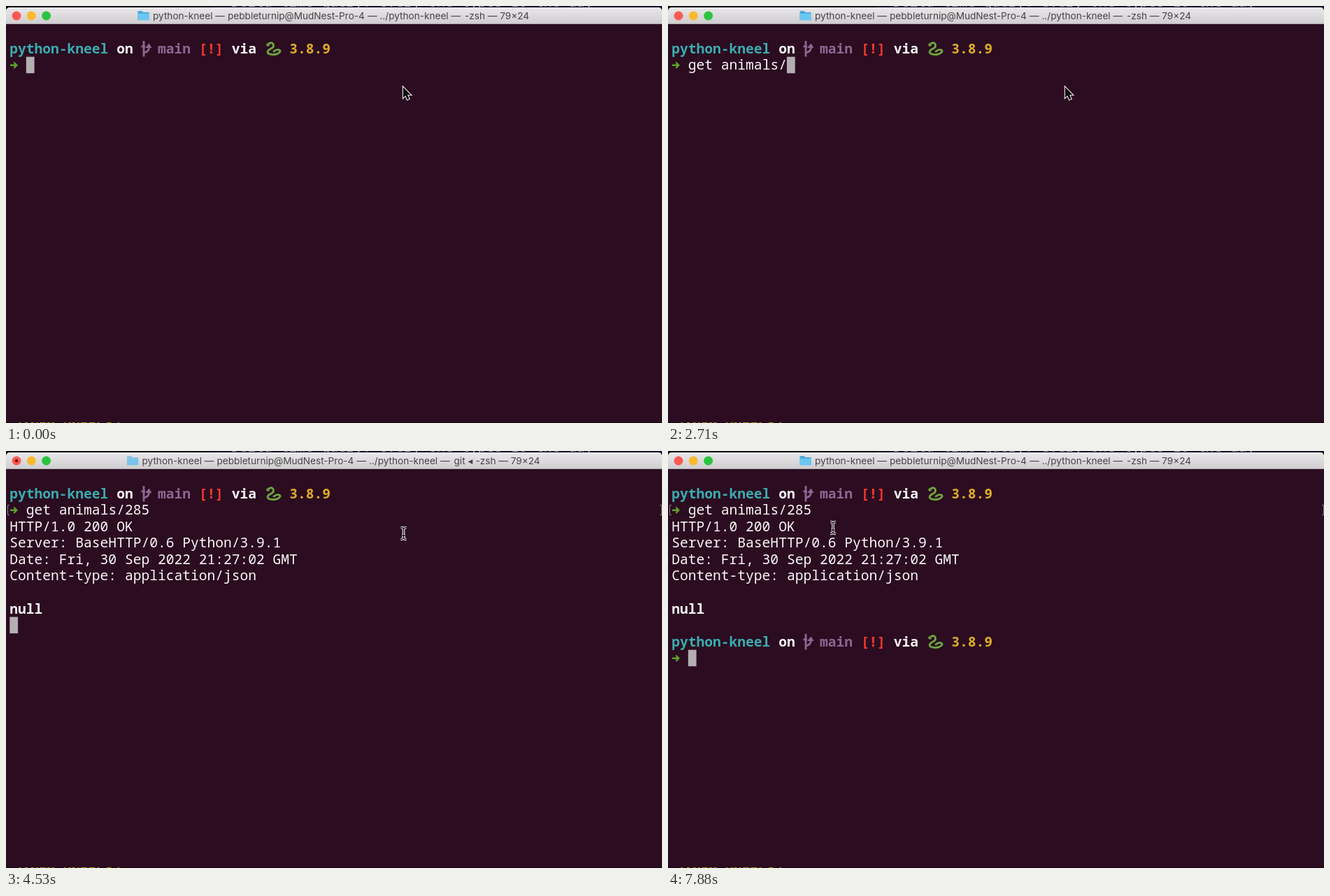
These frames come from a looping animation (938 px wide and 597 px high, 8 s). An HTML page with a canvas:

```html
<!DOCTYPE html>
<html lang="en">
<head>
<meta charset="utf-8">
<title>Terminal request</title>
<style>
  html, body { margin: 0; width: 100%; height: 100%; overflow: hidden; background: #2b0c20; }
  canvas { display: block; }
</style>
</head>
<body>
<canvas id="stage" width="938" height="597"></canvas>
<script>
const ctx = document.getElementById('stage').getContext('2d');
const LOOP = 8000, COL = 11.76, ROW = 23.55, LEFT = 5.3;
const MONO = '19.6px "Noto Sans Mono", monospace';
const COLOR = {
  back: '#2b0c20', text: '#faf7f9', teal: '#3aacae', purple: '#8b6792', red: '#f5392e',
  yellow: '#dcab27', green: '#5ca22c', block: '#b3aeb2'
};

const COMMAND = 'get animals/285';
const KEY_TIMES = [820, 940, 1120, 1410, 1710, 1880, 2000, 2060, 2180, 2290, 2470, 2710, 3410, 3530, 3820];
const ENTER = 4290, BEAM = 4410, REPLY = 4470, GIT = 4530, PYTHON = 4650, DONE = 5000;
const RESPONSE = [
  'HTTP/1.0 200 OK',
  'Server: BaseHTTP/0.6 Python/3.9.1',
  'Date: Fri, 30 Sep 2022 21:27:02 GMT',
  'Content-type: application/json'
];

const colX = col => LEFT + col * COL;
const rowTop = row => 73 + (row - 2) * ROW;

function text(str, x, y, color, font = MONO) {
  ctx.font = font;
  ctx.fillStyle = color;
  ctx.fillText(str, x, y);
}

function cell(str, col, row, color = COLOR.text, bold = false) {
  text(str, colX(col), rowTop(row) + 18.2, color, (bold ? 'bold ' : '') + MONO);
}

function rect(x, y, w, h, color) {
  ctx.fillStyle = color;
  ctx.fillRect(x, y, w, h);
}

function circle(x, y, r, color) {
  ctx.fillStyle = color;
  ctx.beginPath();
  ctx.arc(x, y, r, 0, Math.PI * 2);
  ctx.fill();
}

function stroke(path, color, width) {
  ctx.strokeStyle = color;
  ctx.lineWidth = width;
  ctx.stroke(new Path2D(path));
}

function fill(path, color) {
  ctx.fillStyle = color;
  ctx.fill(new Path2D(path));
}

function at(x, y, draw) {
  ctx.save();
  ctx.translate(x, y);
  draw();
  ctx.restore();
}

function clipped(y, h, draw) {
  ctx.save();
  ctx.beginPath();
  ctx.rect(0, y, 938, h);
  ctx.clip();
  draw();
  ctx.restore();
}

function snake() {
  const body = 'M3 5 Q8 0 11 4 Q13 8 8 10.5 Q1 14 4 17.5 Q10 20.5 17 18 Q23 15 20 12.5 Q16 11 12 14.5';
  ctx.lineCap = ctx.lineJoin = 'round';
  stroke(body, '#4f7f2c', 3.2);
  stroke(body, '#86b04a', 1.5);
  circle(3.6, 5, 2.3, '#79a640');
  circle(4, 4.4, 0.7, '#1d2412');
}

function branch() {
  stroke('M4 0.5 V23 M4 17.5 Q11 16.5 11.5 10 M0.5 8.5 H6', COLOR.purple, 2.8);
  fill('M6 10.5 L11.5 4 L15.5 10.5Z', COLOR.purple);
}

function arrow(row) {
  at(6, rowTop(row) + 11.8, () =>
    fill('M0 -1.2 H6 L4.5 -4.5 H6.5 L11 0 L6.5 4.5 H4.5 L6 1.2 H0Z', COLOR.green));
}

function prompt(row) {
  cell('python-kneel', 0, row, COLOR.teal, true);
  cell('on', 13, row, COLOR.text, true);
  at(193, rowTop(row), branch);
  cell('main', 18, row, COLOR.purple, true);
  cell('[!]', 23, row, COLOR.red, true);
  cell('via', 27, row, COLOR.text, true);
  at(371, rowTop(row) + 1, snake);
  cell('3.8.9', 34, row, COLOR.yellow, true);
  arrow(row + 1);
}

function titleBar(process, extra) {
  rect(0, 0, 938, 8, '#050408');
  rect(297, 0, 641, 3, '#17142a');
  clipped(0, 2, () => text('Delta time query. every one types 10 the day', 322, 1, '#aaa6b4', MONO));

  const shade = ctx.createLinearGradient(0, 2, 0, 26);
  shade.addColorStop(0, '#e9e7e9');
  shade.addColorStop(1, '#cfcdcf');
  ctx.fillStyle = shade;
  ctx.beginPath();
  ctx.roundRect(0, 2, 938, 24, [5, 5, 0, 0]);
  ctx.fill();
  rect(0, 25, 938, 1, '#aca8ac');

  ['#fb5a54', '#fbb92f', '#2bc440'].forEach((color, i) => circle(15 + i * 21.3, 14, 6.5, color));
  if (process) circle(15, 14, 2.2, '#6e0f0c');

  const label = (str, x) => text(str, x, 19, '#454345', '13.6px Inter, sans-serif');
  const shift = extra / 2;
  at(188.5 - shift, 7, () => {
    ctx.globalAlpha = process ? 0.55 : 1;
    fill('M0 1 Q0 0 1 0 H6 L8 2 H16 V13 H0Z', '#4cabdf');
    rect(0, 4, 16.5, 9.5, '#6cc7f4');
  });
  label('python-kneel —', 210 - shift);
  label('pebbleturnip@MudNest-Pro-4', 317 - shift);
  label('— ../python-kneel —', 517 - shift);
  if (process) label(process + ' ◂', 656 - shift);
  label('-zsh — 79×24', 656 + shift);
}

function pointer() {
  at(567.8, 116, () => {
    const shape = 'M0 0 V15.5 L3.5 12.2 L6 18.2 L8.8 17 L6.3 11.2 H11Z';
    ctx.lineJoin = 'miter';
    stroke(shape, '#fff', 2);
    fill(shape, '#0c060a');
  });
}

function beam(x, y) {
  at(x, y, () => {
    const shape = 'M-4 -8.5 Q0 -8.5 0 -5.5 Q0 -8.5 4 -8.5 M0 -6 V6 M-4 8.5 Q0 8.5 0 5.5 Q0 8.5 4 8.5 M-2.5 3 H2.5';
    ctx.lineCap = 'butt';
    stroke(shape, '#f4f1f3', 3.6);
    stroke(shape, '#140810', 1.3);
  });
}

// Progress through a move that is sampled in equal steps
function stepped(t, start, end, steps, first) {
  const n = Math.floor((t - start) / (end - start) * (steps - 1) + 1e-6);
  return Math.min(1, Math.max(0, (n + first) / (steps - 1 + first)));
}

function beamPosition(t) {
  if (t < 7060) return [568.5, 118];
  const sweep = stepped(t, 7060, 7470, 8, 0);
  const ease = sweep * sweep * (3 - 2 * sweep);
  const settle = t < 7710 ? 0 : stepped(t, 7710, 7880, 4, 1);
  return [565 - 303 * ease - 26 * settle, 130 - 20 * ease];
}

function draw(t) {
  rect(0, 0, 938, 597, COLOR.back);
  clipped(595, 2, () => {
    rect(0, 596, 938, 1, '#15060f');
    text('/ANIM KNEELS/', 8, 609.5, '#a98a12', 'italic bold ' + MONO);
  });

  const running = t >= ENTER && t < DONE;
  const process = !running ? '' : t >= GIT && t < PYTHON ? 'git' : 'Python';
  titleBar(process, { '': 0, git: 31, Python: 62 }[process]);

  const typed = KEY_TIMES.filter(time => t >= time).length;
  let block = [2 + typed, 2];
  prompt(1);
  cell(COMMAND.slice(0, typed), 2, 2);

  if (t >= ENTER) {
    block = [0, 3];
    stroke('M5 77.5 H2.5 V91.5 H5 M935 77.5 H937.5 V91.5 H935', '#8d7f89', 1);
  }
  if (t >= REPLY) {
    block = [0, 9];
    RESPONSE.forEach((line, i) => cell(line, 0, 3 + i));
    cell('null', 0, 8, COLOR.text, true);
  }
  if (t >= DONE) {
    block = [2, 11];
    prompt(10);
  }
  rect(colX(block[0]), rowTop(block[1]) - 0.3, COL, ROW, COLOR.block);

  if (t < BEAM) pointer();
  else beam(...beamPosition(t));
}

const start = performance.now();
function tick() {
  draw((performance.now() - start) % LOOP);
  requestAnimationFrame(tick);
}
tick();
</script>
</body>
</html>
```
